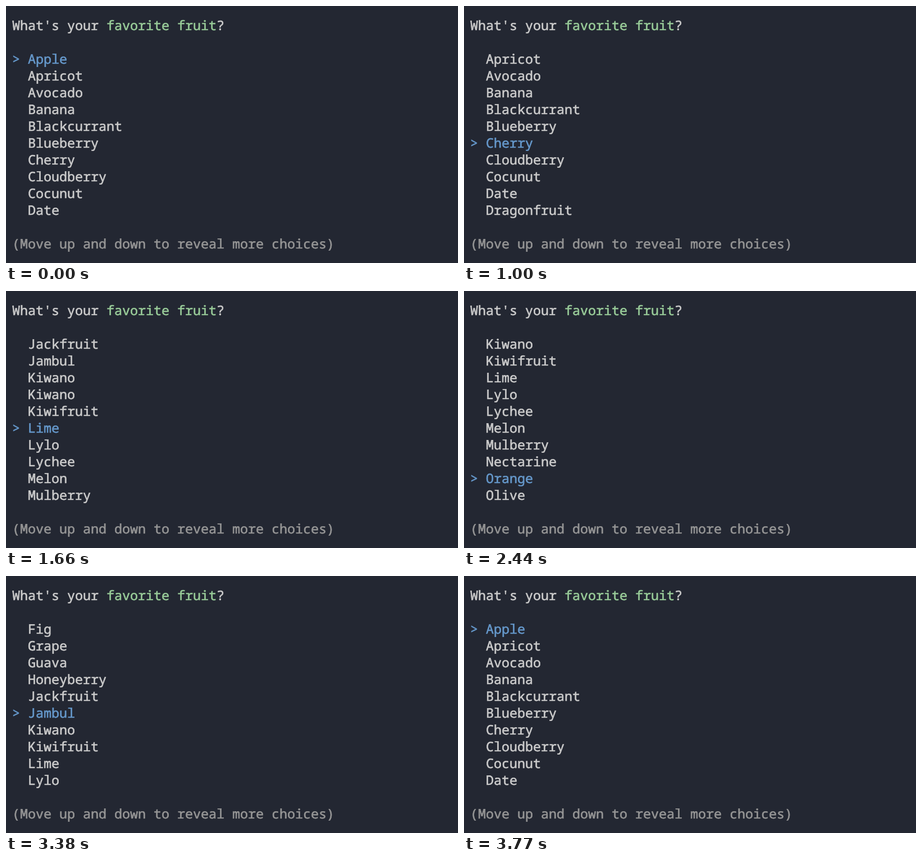
An HTML page that plays this animation: 805x459 px, repeating every 4.46 s.

```html
<!DOCTYPE html>
<html lang="en">
<head>
<meta charset="utf-8">
<title>Fruit prompt</title>
<style>
  html, body { margin: 0; width: 100%; height: 100%; overflow: hidden; background: #232732; }
  svg { display: block; width: 805px; height: 459px; }
  text {
    font: 23.333px "Noto Sans Mono", "DejaVu Sans Mono", monospace;
    font-variant-ligatures: none;
    text-rendering: geometricPrecision;
    white-space: pre;
    color: #ccc;
  }
  /* a thin outline gives the medium weight of the terminal font */
  text, tspan { fill: currentColor; stroke: currentColor; stroke-width: .6px; }
  .green { color: #9c9; }
  .blue { color: #69c; }
  .grey { color: #969696; }
</style>
</head>
<body>
<svg viewBox="0 0 805 459">
  <text x="11" y="43">What's your <tspan class="green">favorite fruit</tspan>?</text>
  <g id="list"></g>
  <text x="11" y="433" class="grey">(Move up and down to reveal more choices)</text>
</svg>
<script>
const LOOP = 4460, ROWS = 10, MIDDLE = 5, LINE = 30, TICK = 30, RATE = 1.5;
const TORN_ROWS = 3; // rows already repainted when a redraw is caught halfway

const fruits = `Apple,Apricot,Avocado,Banana,Blackcurrant,Blueberry,Cherry,Cloudberry,Cocunut,Date,
Dragonfruit,Durian,Egg plant,Elderberry,Fig,Grape,Guava,Honeyberry,Jackfruit,Jambul,
Kiwano,Kiwifruit,Lime,Lylo,Lychee,Melon,Mulberry,Nectarine,Orange,Olive`.split(/,\s*/);
const LAST = fruits.length - 1;

// single key presses: [time, selected item]
const presses = [[0, 0], [300, 1], [400, 2], [500, 3], [600, 4], [800, 5], [1000, 6],
                 [1810, LAST], [2440, 28], [2640, 27], [2900, 26]];

const list = document.getElementById("list");
const rows = Array.from({ length: ROWS }, (_, i) => {
  const row = document.createElementNS("http://www.w3.org/2000/svg", "text");
  row.setAttribute("x", 11);
  row.setAttribute("y", 103 + i * LINE);
  return list.appendChild(row);
});

const clamp = (v, lo, hi) => Math.min(hi, Math.max(lo, v));

// selection painted in the lower rows and, if torn, the next one in the upper rows
function stateAt(t) {
  if (t >= 970 && t < 1000) return { lower: 5, upper: 6 };
  if (t >= 1360 && t < 1810) {
    const n = Math.floor((t - 1360) / TICK);
    const lower = Math.ceil(7 + RATE * n);
    return { lower, upper: n % 2 ? lower : lower + 1 };
  }
  let sel;
  if (t >= 3260) {
    sel = Math.max(0, Math.ceil(25 - RATE * Math.floor((t - 3260) / TICK)));
  } else {
    sel = presses.filter(([at]) => at <= t).pop()[1];
  }
  return { lower: sel, upper: sel };
}

function draw(t) {
  const { lower, upper } = stateAt(t);
  rows.forEach((row, i) => {
    const sel = i < TORN_ROWS ? upper : lower;
    const item = clamp(sel - MIDDLE, 0, fruits.length - ROWS) + i;
    const active = item === sel;
    const label = (active ? "> " : "  ") + fruits[item];
    if (row.textContent !== label) row.textContent = label;
    row.setAttribute("class", active ? "blue" : "");
  });
}

const start = performance.now();
function frame() {
  draw((performance.now() - start) % LOOP);
  requestAnimationFrame(frame);
}
draw(0);
requestAnimationFrame(frame);
</script>
</body>
</html>
```
